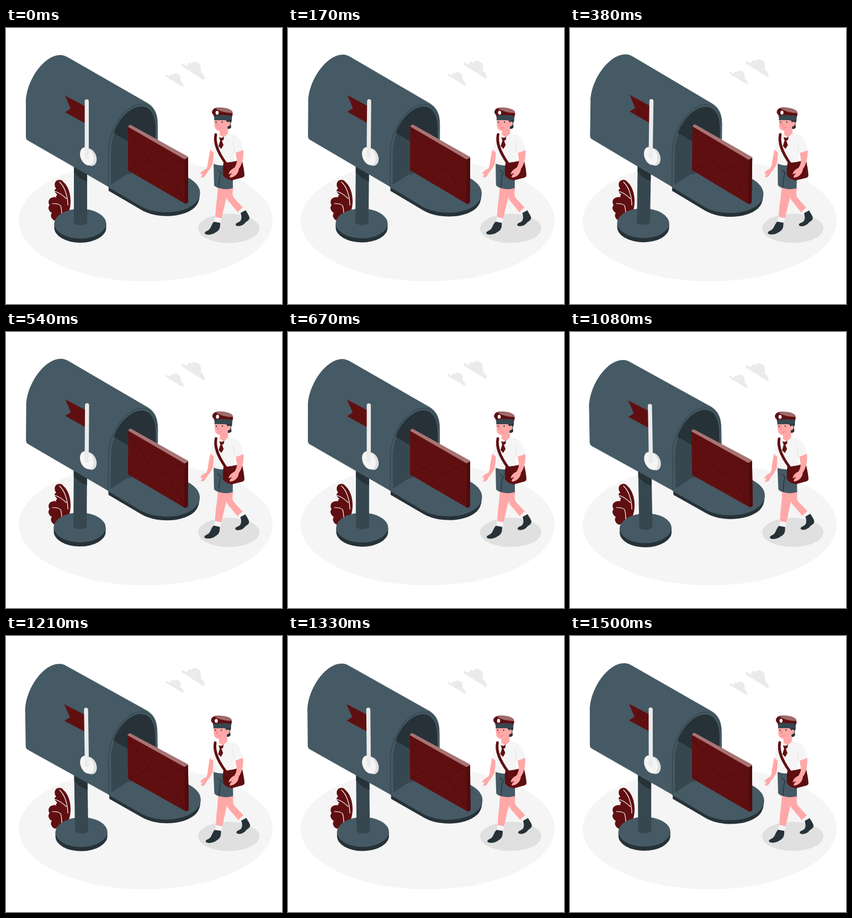
Write an HTML page that moves like this. It is 500 by 500 pixels and loops after 1.54 s.

```html
<!DOCTYPE html>
<html lang="en">
<head>
<meta charset="utf-8">
<title>Mail carrier</title>
<style>
  html, body { margin: 0; height: 100%; overflow: hidden; background: #fff; }
  svg { display: block; width: 100vw; height: 100vh; }
  .slate { fill: #455a64; }
  .shade { fill: #37474f; }
  .dark { fill: #263238; }
  .red { fill: #600f11; }
  .skin { fill: #ffa8a7; }
  .cloth { fill: #f5f5f5; }
  .line { fill: none; stroke-linecap: round; stroke-linejoin: round; }
</style>
</head>
<body>
<svg viewBox="0 0 500 500">
  <ellipse cx="253" cy="349" rx="230" ry="110" fill="#f5f5f5"/>
  <ellipse cx="403.500" cy="363" rx="55.500" ry="26.500" fill="#e0e0e0"/>

  <g id="clouds" fill="#ebebeb">
    <path id="cloud" d="M318 66.500C318 64.500 320 64.500 322 66L329 69C328 64 331 60.500 336 65.500C337 60 345 60 348 64C352 63 354 71 353 80C357 82 360 88 360 91.500Q360 95 357 93.500L320 70Q318 69 318 66.500Z"/>
    <use href="#cloud" transform="translate(289 82) scale(.78 .74) translate(-318 -61)"/>
  </g>

  <g id="plant">
    <path class="red" d="M90 278C94 274 101 274 104 279C112 285 117 300 117 313C117 330 112 340 104 346L97 318C92 312 88 305 93 302C88 298 86 293 91 291C87 286 88 281 90 278Z"/>
    <path class="red" d="M84 307C91 304 96 310 98 316C102 325 102 338 100 347L88 349C81 345 80 339 83 335C77 331 75 325 79 321C75 315 78 308 84 307Z"/>
    <path class="line" stroke="#fff" stroke-width="1.200" d="M97 279C107 288 112 306 112 321M84 318Q96 318 99 322Q101 328 101 340M89 296Q99 299 109 309"/>
  </g>

  <g id="mailbox">
    <path class="dark" d="M87.500 354.500V362A47 27 0 0 0 181.500 362V354.500Z"/>
    <ellipse class="slate" cx="134.500" cy="354.500" rx="47" ry="27"/>
    <path class="shade" d="M123 245H147V352A12 5.500 0 0 1 123 352Z"/>
    <path class="dark" d="M123 251L147 265V278Q133 274 123 261Z"/>

    <path class="dark" d="M186 289V295L246 330C272 345 320 345 342 325Q351 316 351 301Z"/>
    <path class="slate" d="M185 288L230 250L330 271C354 284 358 303 342 318C320 338 272 338 246 324Z"/>

    <path class="slate" d="M36 135C36 94 72 44 103 49.500Q107 50 112 53L253 134C268 142 275 153 275 175V212L220 266L186 288L40 204Q36 202 36 197Z"/>
    <path class="shade" d="M190 284V224C190 186 220 143 245 142C261 142 270 156 271 180V238Z"/>
    <path class="dark" d="M195 190C202 168 224 142 245 142C261 142 270 156 271 180V230L221 205Z"/>
    <path class="slate" d="M190 284L222 263V272L190 291Z"/>
    <path class="line" stroke="#37474f" stroke-width="1.500" d="M185.500 287V223C185.500 184 216 139 245 138C260 138 271 150 273 172"/>

    <path class="red" d="M107 122.500L144 142V173L107 152.500L117 146Z"/>
    <ellipse cx="152" cy="234" rx="11.500" ry="16.500" fill="#e0e0e0" transform="rotate(-22 152 234)"/>
    <ellipse cx="146.500" cy="232.500" rx="11.500" ry="17" fill="#f5f5f5" transform="rotate(-22 146.500 232.500)"/>
    <path class="line" stroke="#ebebeb" stroke-width="7.400" d="M146.300 133V233"/>
  </g>

  <g id="letter">
    <path class="red" d="M221 179L225 176L330 234V315Q328 319 324 318L221 258Z"/>
    <path fill="#a87474" d="M221 179Q223 175 226 175.500L328 232Q330 233 330 235L323.500 238Z"/>
    <path fill="#500b0e" d="M323.500 238L330 234.500V315Q328 319 323.500 317.500Z"/>
    <path class="line" stroke="#4b0a0c" d="M222 184L269 253Q274 261 281 256L322 239M223 257L258 241M288 253L322 311"/>
  </g>

  <g id="carrier">
    <path class="skin" d="M396 290H412C409 301 411 306 415 310L431 327L421 335L401 311Z"/>
    <path class="cloth" d="M420 333L430 324L435 331L426 338Z"/>
    <path class="dark" d="M425 335L434 330C437 335 440 339 441 343C441 348 438 349 434 352C430 358 420 361 416 357C416 352 422 353 425 349C428 344 426 338 425 335Z"/>
    <path class="skin" d="M384 288L406 291C402 300 399 309 397 317L390 347L379 344C380 332 380 322 382 311Z"/>
    <path class="cloth" d="M379 342L391 345L388 354L377 352Z"/>
    <path class="dark" d="M377 351L388 353C388 360 388 366 380 370C374 375 362 376 360 372C360 368 366 368 369 364C372 360 373 354 377 351Z"/>
    <path class="slate" d="M376 244L411 248V290Q399 294 386 290Q380 289 377 285Z"/>
    <path class="line" stroke="#263238" stroke-width="1.300" d="M384 258L390 262Q386 272 386 288"/>

    <path class="skin" d="M370 220L377 223L375 244C373 254 364 260 361 268Q356 273 353 270L356 264Q352 266 352 263Q357 257 363 255Q366 249 366 242Z"/>
    <path class="skin" d="M387 180H402V192L396 200L387 198Z"/>
    <path class="cloth" d="M385 192L378 194Q373 202 371 222L376 225V246Q392 252 413 247L414 226L430 221C427 207 422 195 412 193L402 191L394 198Z"/>
    <path class="line" stroke="#e3e3e3" d="M411 205Q413 214 414 226"/>
    <path class="red" d="M386 198L391 199L395 197L394 203L391 204L394 212L390 219L385 214L388 204Z"/>
    <path class="line" stroke="#600f11" stroke-width="4.800" d="M380 193C377 208 383 224 398 245"/>
    <path class="red" d="M394 244Q409 244 427 238Q431 253 432 266Q432 270 428 271L409 276Q398 274 393 267Q392 255 394 244Z"/>
    <path class="line" stroke="#4b0a0c" d="M394 248Q399 266 414 264Q426 259 428 243"/>
    <path class="skin" d="M416 226L430 221C431 234 428 247 422 255C421 265 413 271 405 271L406 267L410 263L403 265Q405 257 414 253Q419 245 418 238Z"/>

    <path class="dark" d="M378 160H409V168L407 173L408 180Q406 183 402 183L398 170Z"/>
    <path class="skin" d="M377 165L398 166L401 171Q406 167 406.500 173Q406 178 402 178Q400 187 389 187Q379 186 378 179Z"/>
    <path class="shade" d="M378 159H408V166Q403 169 396 167L377 167Z"/>
    <ellipse class="dark" cx="380.500" cy="170.500" rx="1" ry="1.400"/>
    <ellipse class="dark" cx="391.500" cy="170.500" rx="1" ry="1.400"/>
    <path class="line" stroke="#e77c7e" d="M384 171L382 176H385M385 181Q388 182 390 180"/>
    <path class="shade" d="M376 157Q392 153 410 158L409 164Q393 159 377 163Z"/>
    <path class="red" d="M373 152Q374 146 381 144.500Q398 143 408 150Q412 153 410 159.500Q394 156 378 159Q373 156 373 152Z"/>
    <path fill="#a06a6a" d="M379 146Q398 142 408 149Q411 151 410 154Q393 154 379 146Z"/>
    <ellipse cx="382.500" cy="153.500" rx="2.800" ry="3.600" fill="#fafafa"/>
  </g>
</svg>
<script>
  const LOOP = 1540, LEAD = 40;
  const byId = id => document.getElementById(id);
  const swaying = [["mailbox", 193, 219], ["letter", 275.5, 247], ["carrier", 397, 259]];

  // Degrees: 0, +1 at a quarter, -1 at three quarters, linear between.
  const sway = p => p < .25 ? 4 * p : p < .75 ? 2 - 4 * p : 4 * p - 4;
  const lift = p => -10 * (1 - Math.abs(1 - 2 * p));
  const start = LEAD / LOOP;

  function draw(now) {
    const p = (now + LEAD) % LOOP / LOOP;
    const angle = sway(p) - sway(start);
    for (const [id, x, y] of swaying)
      byId(id).setAttribute("transform", `rotate(${angle} ${x} ${y})`);
    byId("clouds").setAttribute("transform", `translate(0 ${lift(p) - lift(start)})`);
  }

  let begin;
  function tick() {
    const now = performance.now();
    begin ??= now;
    draw(now - begin);
    requestAnimationFrame(tick);
  }
  tick();
</script>
</body>
</html>
```
